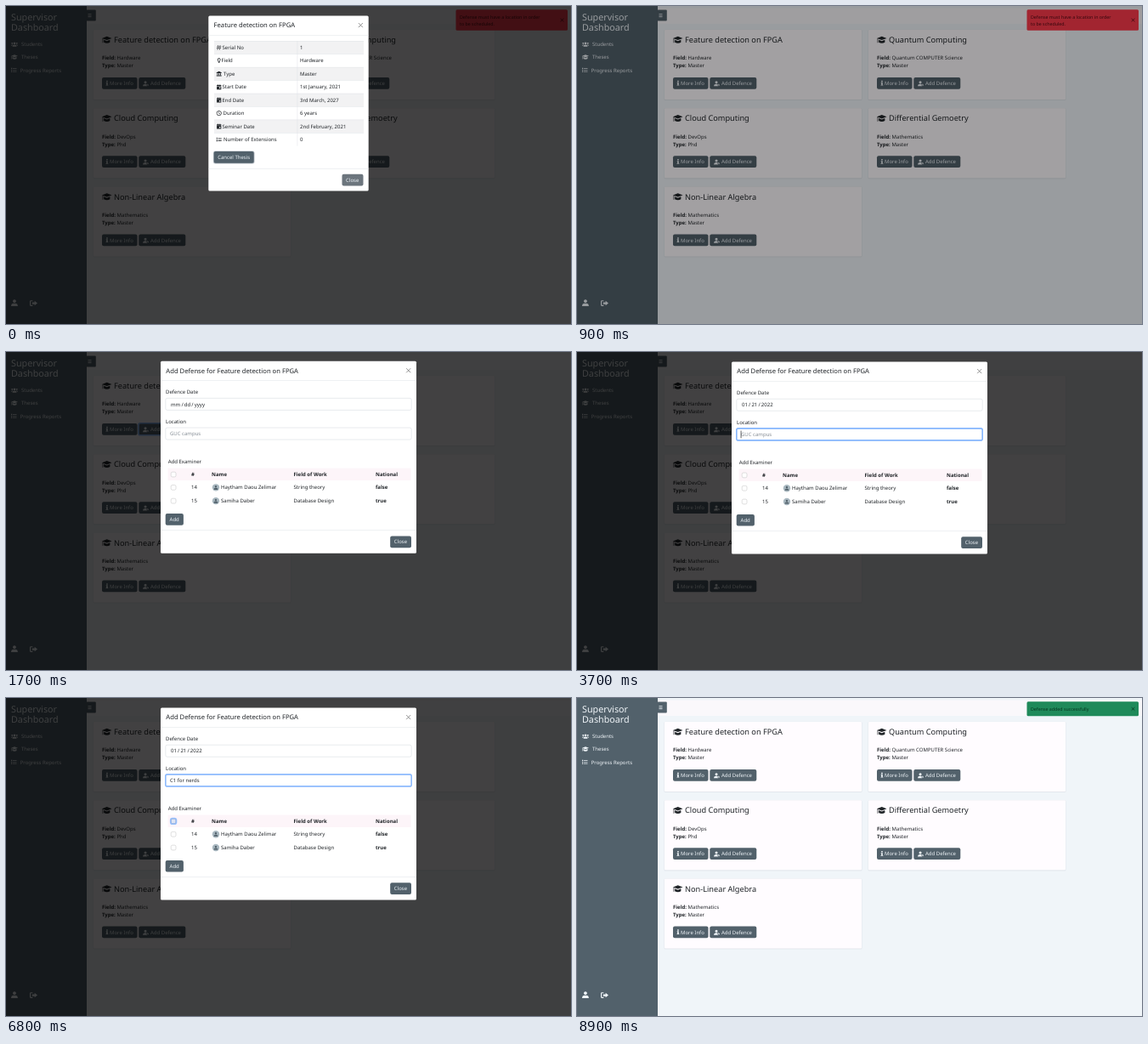
An HTML page that plays this animation: 665x374 px, repeating every 9 s.

```html
<!DOCTYPE html>
<html lang="en">
<head>
<meta charset="utf-8">
<title>Supervisor Dashboard</title>
<style>
  html, body { margin: 0; width: 100%; height: 100%; overflow: hidden; background: #f0f5f9; }
  svg { display: block; width: 665px; height: 374px; font: 6px "Noto Sans", sans-serif; fill: #212529;
        text-rendering: geometricPrecision; }
  text { white-space: pre; }
  .b { font-weight: 700; }
  .light { fill: #f0f5f9; }
</style>
</head>
<body>
<svg id="stage" viewBox="0 0 665 374"></svg>
<script>
const LOOP = 9000, SLATE = '#52616b', BLUE = '#86b7fe';

// Icons live in a 16 x 16 box.
const PERSON = 'M7 1a3.5 3.5 0 1 0 .01 0zM0 15q0-6 5-6h4q5 0 5 6z';
const ICONS = {
  cap: 'M0 5.5 8 2.5 16 5.5 8 8.5zM3 8 8 10 13 8v4q-5 3-10 0zM.8 6h1v7h-1z',
  person: PERSON,
  personPlus: PERSON + 'M10 11h6v2h-6zM12 9h2v6h-2z',
  people: 'M8 3a2.6 2.6 0 1 0 .01 0zM3 13.5q0-4.5 5-4.5t5 4.5zM2.5 4a1.8 1.8 0 1 0 .01 0z' +
    'M13.5 4a1.8 1.8 0 1 0 .01 0zM0 11.500q0-3 4-3l-1.500 3zM16 11.500q0-3-4-3l1.500 3z',
  list: 'M0 2h3v3H0zM5 2.700h11v1.700H5zM0 6.500h3v3H0zM5 7.200h11v1.700H5zM0 11h3v3H0zM5 11.700h11v1.700H5z',
  exit: 'M6 2H2q-2 0-2 2v8q0 2 2 2h4v-2H2V4h4zM5 6h5V3l6 5-6 5v-3H5z',
  info: 'M6 1h4v3.500H6zM5 6h5v7h1.500v2h-7v-2H6V8H5z',
  hash: 'M4 1h2L4.500 15h-2zM10.500 1h2L11 15H9zM1.500 4.500h13.500v2H1.500zM.5 9.500h13.500v2H.5z',
  bulb: 'M8 0a5 5 0 0 1 3 9v3H5V9a5 5 0 0 1 3-9zM8 1.700a3.300 3.300 0 0 0-1.500 6v2.600h3V7.700a3.300 3.300 0 0 0-1.500-6zM6 13h4v2H6z',
  landmark: 'M8 0 16 4v2H0V4zM2 7h2.500v5H2zM6.700 7h2.500v5H6.700zM11.500 7H14v5h-2.500zM0 13h16v2.500H0z',
  calendar: 'M1 2h3V0h2v2h4V0h2v2h3v3H1zM1 6h14v10H1zM8.500 9v4h4V9z',
  clock: 'M8 0a8 8 0 1 0 .01 0zM8 1.800a6.200 6.200 0 1 1-.01 0zM7.200 4h1.600v4l3 2-1 1.200-3.600-2.400z'
};

const text = (x, y, s, attrs = '') => `<text x="${x}" y="${y}" ${attrs}>${s}</text>`;
const rect = (x, y, w, h, attrs = '') => `<rect x="${x}" y="${y}" width="${w}" height="${h}" ${attrs}/>`;
const icon = (name, x, y, size, attrs = '') =>
  `<path d="${ICONS[name]}" fill-rule="evenodd" transform="translate(${x} ${y}) scale(${size / 16})" ${attrs}/>`;
const line = (x1, x2, y) => rect(x1, y, x2 - x1, .5, 'fill="#dee2e6"');
const cross = (x, y, r, color) =>
  `<path d="M${x - r} ${y - r}l${2 * r} ${2 * r}m0 ${-2 * r}l${-2 * r} ${2 * r}" stroke="${color}" stroke-width=".8"/>`;
const button = (x, y, w, label, pad = 4.7, attrs = '') =>
  rect(x, y, w, 13.7, `rx="2" fill="${SLATE}" ${attrs}`) + text(x + pad, y + 9, label, 'class="light"');
const ring = (id, x, y, w, h, r = 2) =>
  rect(x, y, w, h, `id="${id}" rx="${r}" fill="none" stroke="${BLUE}" stroke-width="1.6"`);

function card(x, y, title, field, type, id) {
  return rect(x - .5, y - .3, 233, 83.4, 'rx="1.5" fill="#dfe3e9" opacity=".7"') +
    rect(x, y, 232, 82, 'rx="1" fill="#fffcff"') +
    icon('cap', x + 10, y + 6, 11.5) +
    text(x + 24, y + 15, title, 'font-size="9.2"') +
    text(x + 10, y + 35.2, `<tspan class="b">Field:</tspan> ${field}`) +
    text(x + 10, y + 44.3, `<tspan class="b">Type:</tspan> ${type}`) +
    button(x + 10, y + 56, 41.5, 'More Info', 9) +
    icon('info', x + 12.7, y + 59.4, 6.5, 'class="light"') +
    button(x + 53.3, y + 56, 55, 'Add Defence', 13.7, `id="${id}"`) +
    icon('personPlus', x + 58, y + 59.7, 7, 'class="light"');
}

function modalFrame(x, w, h, title, footer) {
  const right = x + w;
  return rect(x, 11.5, w, h, 'rx="1.5" fill="#fff"') +
    text(x + 6.3, 25.4, title, 'font-size="7.65"') +
    cross(right - 9.3, 22.6, 2.5, '#777') +
    line(x, right, 34.2) + line(x, right, footer);
}

const page = () =>
  rect(0, 0, 665, 374, 'fill="#f0f5f9"') +
  rect(95, 2.500, 570, 18.500, 'fill="#faf8fb"') +
  rect(0, 0, 95, 374, `fill="${SLATE}"`) +
  rect(94.5, 4.500, 11.300, 13, `rx="1" fill="${SLATE}"`) +
  [9.300, 10.900, 12.500].map(y => rect(96.500, y, 4, .7, 'class="light"')).join('') +
  '<g class="light">' +
  text(6, 16.8, 'Supervisor', 'font-size="10.75"') + text(6, 29, 'Dashboard', 'font-size="10.75"') +
  icon('people', 6, 41, 8) + text(18, 47.2, 'Students') +
  icon('cap', 6, 56, 8) + text(18, 62.2, 'Theses') +
  icon('list', 6, 72, 6.5) + text(16.700, 77.5, 'Progress Reports') +
  icon('person', 6, 344.6, 9) + icon('exit', 28, 345, 9) + '</g>' +
  card(103, 28, 'Feature detection on FPGA', 'Hardware', 'Master', 'addFirst') +
  card(343, 28, 'Quantum Computing', 'Quantum COMPUTER Science', 'Master', 'addSecond') +
  card(103, 120.3, 'Cloud Computing', 'DevOps', 'Phd', 'addCloud') +
  card(343, 120.3, 'Differential Gemoetry', 'Mathematics', 'Master', 'addFourth') +
  card(103, 212.5, 'Non-Linear Algebra', 'Mathematics', 'Master', 'addFifth') +
  ring('addRing', 156, 83.8, 55.5, 14);

const toast = (id, h, color, ink, lines) =>
  `<g id="${id}">` + rect(529.5, 4.3, 131.5, h, `rx="1.5" fill="${color}"`) +
  lines.map((s, i) => text(534, 14.8 + i * 7.7, s, `font-size="5.3" fill="${ink}"`)).join('') +
  cross(654.5, 4.3 + h / 2, 1.8, ink) + '</g>';

function infoModal() {
  const rows = [
    ['hash', 254.5, 'Serial No', '1'], ['bulb', 253.5, 'Field', 'Hardware'],
    ['landmark', 256, 'Type', 'Master'], ['calendar', 254.5, 'Start Date', '1st January, 2021'],
    ['calendar', 254.5, 'End Date', '3rd March, 2027'], ['clock', 255.5, 'Duration', '6 years'],
    ['calendar', 254.5, 'Seminar Date', '2nd February, 2021'], ['list', 256, 'Number of Extensions', '0']
  ];
  return modalFrame(238.3, 188.4, 206, 'Feature detection on FPGA', 191) +
    rows.map(([name, x, label, value], i) => {
      const y = 41 + i * 15.45;
      return (i % 2 ? '' : rect(245, y, 176, 15.45, 'fill="#f2f2f3"')) + line(245, 421, y) +
        icon(name, 247.700, y + 4.8, 6) + text(x, y + 9.9, label) + text(346, y + 9.9, value);
    }).join('') +
    rect(342.7, 41, .5, 123.6, 'fill="#dee2e6"') +
    rect(243.9, 170.4, 48.6, 15, 'rx="2.5" fill="#b4bcc3"') +
    button(244.700, 171, 47, 'Cancel Thesis', 4.5) +
    button(395.5, 197.7, 25, 'Close', 4.6, 'style="fill:#6c757d"');
}

function examiner(y, id, name, field, national) {
  return text(218, y, id) +
    `<circle cx="247" cy="${y - 2}" r="4.200" fill="#a9b8c0"/>` + icon('person', 244.5, y - 4.700, 5.6, `fill="${SLATE}"`) +
    text(253, y, name) + text(338.5, y, field) + text(435, y, national, 'class="b"');
}

const checkbox = (y, i) =>
  rect(194.2, y - 2.9, 5.8, 5.8, `id="box${i}" rx="1.700" stroke-width=".5"`) +
  `<path id="tick${i}" d="M195.500 ${y}l1.300 1.300 2-2.600" fill="none" stroke="#fff" stroke-width=".8"/>`;

const field = (id, y) =>
  rect(187.8, y, 289.4, 14, 'rx="2" fill="#fff" stroke="#ced4da" stroke-width=".5"') +
  ring(id, 187.8, y, 289.4, 14);

const defenceModal = () =>
  modalFrame(182, 301, 226, 'Add Defense for Feature detection on FPGA', 210) +
  text(188, 50, 'Defence Date') + field('dateRing', 55.2) +
  rect(0, 57.8, 0, 8.500, 'id="mark" fill="#1a73e8"') +
  text(194, 64.4, '', 'id="date" style="word-spacing:-.4px"') +
  text(188, 84.9, 'Location') + field('placeRing', 89.9) +
  text(193, 99, '', 'id="place"') + rect(192.700, 92.500, .7, 8.800, 'id="caret"') +
  text(190.7, 132, 'Add Examiner') +
  rect(190.500, 137.5, 286, 14.5, 'fill="#fdf5f9"') +
  [[218, '#'], [242, 'Name'], [338.5, 'Field of Work'], [435, 'National']]
    .map(([x, s]) => text(x, 147.1, s, 'class="b"')).join('') +
  examiner(162.200, 14, 'Haytham Daou Zelimar', 'String theory', 'false') +
  examiner(178, 15, 'Samiha Daber', 'Database Design', 'true') +
  [144.9, 160.200, 176].map(checkbox).join('') + ring('boxRing', 193.700, 141.500, 6.800, 6.800) +
  button(187.7, 190.9, 21.2, 'Add', 4.9, 'id="addButton"') + ring('addButtonRing', 187.200, 190.400, 22.200, 14.700) +
  button(452.2, 217.300, 24.8, 'Close', 4.6);

const stage = document.getElementById('stage');
stage.innerHTML = page() +
  toast('errorToast', 24.5, '#ff3a4c', '#500a12',
    ['Defense must have a location in order', 'to be scheduled.']) +
  toast('okToast', 17, '#1f8a5a', '#06341f', ['Defense added successfully']) +
  rect(0, 0, 665, 374, 'id="backdrop" fill="#000"') +
  `<g id="info">${infoModal()}</g><g id="defence">${defenceModal()}</g>`;
const el = {};
stage.querySelectorAll('[id]').forEach(n => el[n.id] = n);

const ramp = (t, start, length = 150) => Math.min(1, Math.max(0, (t - start) / length));
const during = (t, a, b) => t >= a && t < b;
const easeOut = p => 1 - (1 - p) * (1 - p);
const at = (t, steps) => steps.filter(s => t >= s[0]).pop();
const fade = (id, value) => el[id].setAttribute('opacity', value);
const pulse = (t, a, b) => ramp(t, a) - ramp(t, b);

// Each date step: time, text, and the range of characters selected.
const DATE = [
  [0, 'mm / dd / yyyy'], [2100, 'mm / dd / yyyy', 0, 1], [2500, '00 / dd / yyyy', 0, 1],
  [2600, '01 / dd / yyyy', 5, 6], [2700, '01 / 02 / yyyy', 5, 6], [2800, '01 / 21 / yyyy', 10, 13],
  [3200, '01 / 21 / 0002', 10, 13], [3300, '01 / 21 / 0020', 10, 13],
  [3400, '01 / 21 / 0202', 10, 13], [3500, '01 / 21 / 2022', 10, 13], [3600, '01 / 21 / 2022']
];
const PLACE = [
  [0, 'GUC campus'], [4600, 'C'], [4700, 'C1'], [5000, 'C1 f'],
  [5500, 'C1 for n'], [5600, 'C1 for ne'], [5800, 'C1 for nerds']
];

function showModal(id, t, open, close) {
  fade(id, pulse(t, open, close));
  const lift = 1 - easeOut(ramp(t, open, 300)) + easeOut(ramp(t, close, 300));
  el[id].setAttribute('transform', `translate(0 ${-19 * lift})`);
}

function drawDate(t) {
  const [, value, from, to] = at(t, DATE);
  el.date.textContent = value;
  if (from === undefined) return el.mark.setAttribute('width', 0);
  const x = el.date.getStartPositionOfChar(from).x;
  el.mark.setAttribute('x', x - .4);
  el.mark.setAttribute('width', el.date.getEndPositionOfChar(to).x - x + .8);
  const part = document.createElementNS(stage.namespaceURI, 'tspan');
  part.textContent = value.slice(from, to + 1);
  part.setAttribute('fill', '#fff');
  el.date.replaceChildren(value.slice(0, from), part, value.slice(to + 1));
}

function draw(t) {
  fade('backdrop', .74 * (1 - ramp(t, 825) + pulse(t, 1338, 8300)));
  showModal('info', t, -1000, 525);
  showModal('defence', t, 1465, 8000);
  fade('errorToast', 1 - ramp(t, 1050));
  fade('okToast', ramp(t, 8430));

  el.addFirst.style.fill = during(t, 1200, 1500) ? '#a5b2bd' : SLATE;
  el.addCloud.style.fill = during(t, 8800, 8880) ? '#66757f' : SLATE;
  fade('addRing', pulse(t, 1150, 2100));

  drawDate(t);
  fade('dateRing', pulse(t, 2100, 3540));
  fade('placeRing', pulse(t, 3540, 6790));
  el.place.textContent = at(t, PLACE)[1];
  el.place.style.fill = t < 4600 ? '#868e96' : '#212529';
  fade('caret', during(t, 3600, 4200) || during(t, 4400, 4600) ? 1 : 0);

  const checked = t >= 6900;
  for (let i = 0; i < 3; i++) {
    const pressed = i === 0 && during(t, 6750, 6900);
    el['box' + i].style.fill = checked ? '#0d6efd' : pressed ? '#dde3f3' : '#fff';
    el['box' + i].style.stroke = checked ? '#0d6efd' : pressed ? '#5b6f99' : '#bfbfbf';
    fade('tick' + i, checked ? 1 : 0);
  }
  fade('boxRing', pulse(t, 6680, 7400));
  el.addButton.style.fill = during(t, 7350, 8600) ? '#46535c' : SLATE;
  fade('addButtonRing', ramp(t, 7450));
}

function tick() {
  draw(performance.now() % LOOP);
  requestAnimationFrame(tick);
}
tick();
</script>
</body>
</html>
```
